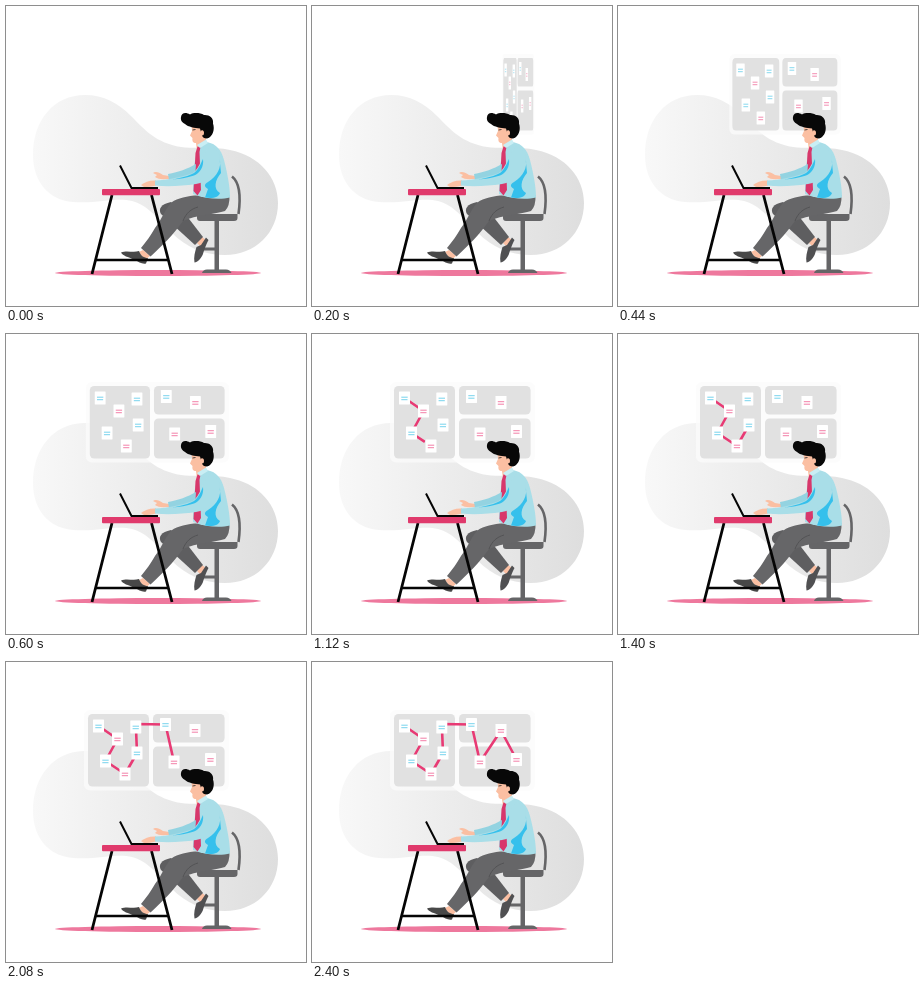
An HTML page that plays this animation: 300 px wide and 300 px high, repeating every 2440 ms.

```html
<!DOCTYPE html>
<html lang="en">
<head>
<meta charset="utf-8">
<title>Planning at the desk</title>
<style>
html, body { margin: 0; width: 100%; height: 100%; overflow: hidden; background: #fff; }
svg { display: block; width: 100%; height: 100%; }
</style>
</head>
<body>
<svg viewBox="0 0 300 300" xmlns="http://www.w3.org/2000/svg">
  <defs>
    <linearGradient id="mist" x1="0" y1="0" x2="1" y2="0">
      <stop offset="0" stop-color="#f8f8f8"/>
      <stop offset="0.5" stop-color="#ebebeb"/>
      <stop offset="1" stop-color="#dedede"/>
    </linearGradient>
  </defs>

  <path fill="url(#mist)" d="M79 89C98 89 112 97 125 110C139 124 150 137 175 141C192 143 206 140 224 144C254 150 272 172 272 197C272 227 249 249 219 249C197 249 180 241 166 227C152 214 144 200 126 195C110 191 91 198 67 196C42 194 27 175 27 149C27 114 48 89 79 89Z"/>

  <g id="board">
    <rect x="78" y="48" width="145" height="80.500" rx="6" fill="#fbfbfb" opacity=".75"/>
    <g id="panels" fill="#e1e1e1"></g>
    <polyline id="thread" fill="none" stroke="#e83a74" stroke-width="2.6" stroke-linejoin="round"/>
    <g id="cards"></g>
  </g>

  <ellipse cx="152" cy="267" rx="103" ry="3" fill="#ee789d"/>

  <!-- chair -->
  <path fill="none" stroke="#656567" stroke-width="2.600" d="M226 170.500C233 176 235 190 232.500 208"/>
  <g fill="#656567">
    <path d="M191 208H231.500V212Q231.500 215 228 215H194Q191 215 191 212Z"/>
    <rect x="208.500" y="214" width="4.500" height="51"/>
    <rect x="197" y="241.500" width="13" height="3"/>
    <path d="M196 267Q197 263.500 201 263.500H220Q224 263.500 225.500 267Z"/>
  </g>

  <!-- legs -->
  <path fill="#fbbfa2" d="M191 237L196 231L200 234L195 241ZM137 244L144 250L139 254L133 246Z"/>
  <path fill="#505052" d="M200 231.500L202.500 234C199.500 240 198.500 243 197 248C195 253 191.500 256 188.500 256.500C187.500 251 189 246 190.500 241L195 239Z"/>
  <path fill="#5e5e60" d="M165 196C155 198 152 203 155 208L189 239L197 231L180 209Z"/>
  <path fill="#484848" d="M133 245C135 250 138 252 142 252L140 257.500C136 258.500 133 256 128 253.500C122 251 117 250 115 246.500C121 244 127 247 133 245Z"/>
  <path fill="#666668" d="M188 189.500C178 191 168 193 164 198C158 206 154 216 149 222C145 229 140 236 135 242L144.500 250.500C156 240 168 228 177 215C190 209 210 208 219 205Q224 200 223.500 189Z"/>
  <path fill="none" stroke="#535355" stroke-width="1" d="M177 215C180 207 185 203 192 201"/>

  <!-- torso -->
  <path fill="#fbbfa2" d="M189 129H200V143L191 145Z"/>
  <path fill="#a9dee8" d="M193 140L201 136C210 138 215 143 218 154C221 166 224 180 224 191.500C214 194 200 193 187 188C187 173 187 155 193 140Z"/>
  <path fill="#d8376b" d="M191.500 140.500L194.500 141L193.500 146L195 184L191.500 189.500L187.500 185L189.500 147Z"/>
  <path fill="#35c0ec" d="M213.500 152C216 162 211 170 202 176C197 179 199 181 202 183L199 191.500C207 193 213 191 214 187C207 183 209 174 215 167Z"/>

  <!-- desk -->
  <g fill="none" stroke="#050505">
    <path stroke-width="2.800" d="M106 189L86 268M145.500 189L166 268"/>
    <path stroke-width="2.400" d="M90 254H162"/>
  </g>
  <rect x="96" y="183" width="58" height="6.200" rx="1" fill="#e03a6c"/>
  <path fill="none" stroke="#050505" stroke-width="2" stroke-linejoin="round" d="M114 159.500L125.500 182H152"/>

  <!-- arms -->
  <path fill="#fbbfa2" d="M163 170L157 169C153 166 149 165 147 167L151 169L149 171C153 174 158 173 163 173Z"/>
  <path fill="#93d3e1" d="M162 168C173 166 181 163 190 158L189 172L163 174Z"/>
  <path fill="#fbbfa2" d="M150 174.500C144 174 139 176 135 179L138 181C142 181 146 181 150 179.500Z"/>
  <path fill="#a9dee8" d="M204 140C212 142 216 150 213 157C209 168 202 176 190 178C176 180 162 181 149 179.500L149 174.500C162 174 176 171 187 167C194 162 196 149 204 140Z"/>
  <path fill="#35c0ec" d="M166 173.500C175 172 183 170 188 167C193 163 195 157 197 153C198 161 194 167 188 169.500C181 172 173 173 166 173.500Z"/>

  <!-- head -->
  <path fill="#fbbfa2" d="M185.500 119H199V132C197 135 194 137 190 137C187 137 186 135 186.500 132L184 129.500L186 125Z"/>
  <path fill="none" stroke="#222" stroke-width=".8" d="M186.500 124L189.500 123.500"/>
  <path fill="#080808" d="M175 111C175.500 106.500 180 106 184 108.500C187 106.500 194 106.500 198 109C203 108.500 208 112 207 117.500C209 123 207 131 201 132.500C198 132.500 196 131 195.500 128L194 122.500C189 122 182 121 179 118C175.500 116 174.500 114 175 111Z"/>
  <path fill="#fbbfa2" d="M194.500 125C197 123 199 126 197.500 129L195 130Z"/>
  <path fill="#c9eef4" d="M191 139L200 133.500L202 137L194 142Z"/>
</svg>
<script>
const LOOP = 2440;
const EDGE = 218.6;
const PINK = '#ef5f92', BLUE = '#55c8e8';
const $ = id => document.getElementById(id);

function add(parent, tag, attrs) {
  const el = document.createElementNS('http://www.w3.org/2000/svg', tag);
  for (const k in attrs) el.setAttribute(k, attrs[k]);
  parent.append(el);
  return el;
}

const panels = [[82, 52, 61, 72.5], [147, 52, 71.6, 28.5], [147, 84.5, 71.6, 40]];
// cards in the order the thread visits them
const cards = [
  [92.5, 64, BLUE], [111.5, 77, PINK], [99.5, 99, BLUE], [119, 112, PINK],
  [131, 91, BLUE], [129.8, 65, BLUE], [159.5, 62.5, BLUE], [168, 100, PINK],
  [189, 68.5, PINK], [204.5, 97.5, PINK]
];

for (const [x, y, width, height] of panels)
  add($('panels'), 'rect', { x, y, width, height, rx: 4.5 });

for (const [x, y, color] of cards) {
  const g = add($('cards'), 'g', { transform: `translate(${x} ${y})` });
  add(g, 'rect', { x: -5.5, y: -6.5, width: 11, height: 13, rx: 0.4, fill: '#fff' });
  add(g, 'path', { d: 'M-3.2-.8H3.2M-3.2 1.7H3', stroke: color, 'stroke-width': 1, opacity: 0.8 });
}

const stops = cards.map(([x, y], i) => [x, i === 5 ? 62 : y]);
const lengths = stops.slice(1).map(([x, y], i) => Math.hypot(x - stops[i][0], y - stops[i][1]));

// time in ms, drawn length of the thread
const pace = [[608, 0], [1120, 64], [1720, 137], [2240, 224], [2410, 266]];

function drawn(t) {
  if (t <= pace[0][0]) return 0;
  for (let i = 1; i < pace.length; i++) {
    const [t0, a] = pace[i - 1], [t1, b] = pace[i];
    if (t < t1) return a + (b - a) * (t - t0) / (t1 - t0);
  }
  return Infinity;
}

function threadPoints(len) {
  const pts = [stops[0]];
  for (let i = 0; i < lengths.length && len > 0; i++) {
    const k = Math.min(1, len / lengths[i]);
    const [x0, y0] = stops[i], [x1, y1] = stops[i + 1];
    pts.push([x0 + (x1 - x0) * k, y0 + (y1 - y0) * k]);
    len -= lengths[i];
  }
  return pts.length > 1 ? pts.join(' ') : '';
}

function render(t) {
  const s = (1 - Math.cos(Math.PI * Math.min(1, t / 648))) / 2;
  const right = 222 - (222 - EDGE) * s;
  $('board').setAttribute('transform', `translate(${right} 0) scale(${s} 1) translate(${-EDGE} 0)`);
  $('board').setAttribute('visibility', t < 40 ? 'hidden' : 'visible');
  $('thread').setAttribute('points', threadPoints(drawn(t)));
}

const start = performance.now();
function tick() {
  render((performance.now() - start) % LOOP);
  requestAnimationFrame(tick);
}
render(0);
requestAnimationFrame(tick);
</script>
</body>
</html>
```
